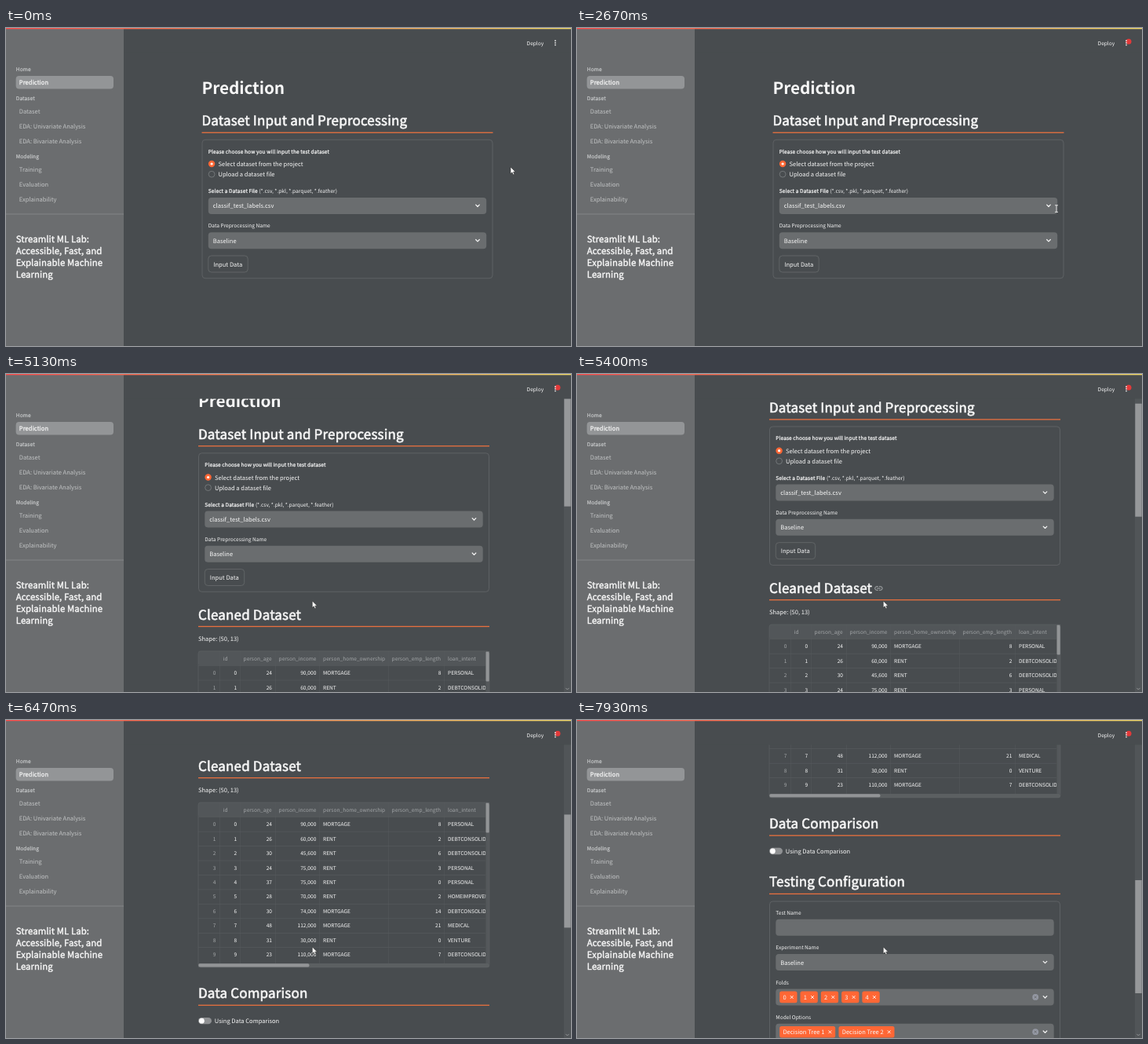
Recreate the animation shown at these times as an HTML page. Size 720 px wide and 405 px high, loop 8 s.

```html
<!DOCTYPE html>
<html lang="en">
<head>
<meta charset="utf-8">
<title>Prediction</title>
<style>
  html, body { margin: 0; width: 100%; height: 100%; overflow: hidden; background: #484c4f; }
  svg { display: block; width: 720px; height: 405px; }
  text { font: 7.55px "Noto Sans CJK JP", "Noto Sans CJK SC", "Noto Sans", sans-serif;
         fill: currentColor; color: #f7f7f7; text-rendering: geometricPrecision; white-space: pre; }
  .small { font-size: 6.6px; }
  .semi { stroke: currentColor; stroke-width: .036em; letter-spacing: .012em; }
  .h1 { font-size: 20.8px; font-weight: 700; letter-spacing: -.005em; }
  .h2 { font-size: 17px; letter-spacing: .0095em; }
  .h3 { font-size: 11.3px; letter-spacing: .0095em; }
  .dim { color: #c3c5c6; }
  .faint { color: #a3a6a8; }
  .end { text-anchor: end; }
  #button.hover rect { stroke: #ff6b3d; }
  #button.hover text { color: #ff6b3d; }
</style>
</head>
<body>
<svg id="stage" viewBox="0 0 720 405"></svg>
<script>
const BG = '#484c4f', FIELD = '#6a6d6f', LINE = '#676b6d', ACCENT = '#ff6735';

const text = (x, y, str, cls = '') => `<text x="${x}" y="${y}" class="${cls}">${str}</text>`;
const rect = (x, y, w, h, fill, r = 0, extra = '') =>
  `<rect x="${x}" y="${y}" width="${w}" height="${h}" rx="${r}" fill="${fill}" ${extra}/>`;
const circle = (x, y, r, fill, extra = '') => `<circle cx="${x}" cy="${y}" r="${r}" fill="${fill}" ${extra}/>`;
const stroke = (d, color, width = 1) =>
  `<path d="${d}" fill="none" stroke="${color}" stroke-width="${width}" stroke-linecap="round" stroke-linejoin="round"/>`;

const heading = (y, str) => text(0, y, str, 'semi h2') + rect(0, y + 8.4, 371, 1.3, '#e8703f');
const panel = (y, h) => rect(.5, y, 370, h, 'none', 4, `stroke="${LINE}" stroke-width=".7"`);
const chevron = y => stroke(`M349.2 ${y - 1.2}l2.3 2.3 2.3-2.3`, '#f7f7f7', 1.2);
const field = (y, value = '') => rect(8.3, y, 354.4, 21, FIELD, 4) + text(14.2, y + 13.5, value);
const select = (y, value) => field(y, value) + chevron(y + 10.5);
const cross = (x, y, r, color) => stroke(`M${x - r} ${y - r}l${2 * r} ${2 * r}m0 ${-2 * r}l${-2 * r} ${2 * r}`, color, .9);
const chip = (x, y, w, label) => rect(x, y, w, 14.6, ACCENT, 2.5) + text(x + 4.2, y + 10.2, label) +
  cross(x + w - 6.8, y + 7.4, 1.6, '#fff');
const multiselect = (y, labels, w, step) => select(y) +
  labels.map((label, i) => chip(13.2 + i * step, y + 3.2, w, label)).join('') +
  circle(339.2, y + 10.5, 3.9, '#9498a3') + cross(339.2, y + 10.5, 1.2, FIELD);

function sidebar() {
  const items = [
    [55, 'Home', 1], [91.5, 'Dataset', 1], [109, 'Dataset'], [128, 'EDA: Univariate Analysis'],
    [147, 'EDA: Bivariate Analysis'], [165.7, 'Modeling', 1], [183.3, 'Training'],
    [202, 'Evaluation'], [221, 'Explainability']];
  const title = ['Streamlit ML Lab:', 'Accessible, Fast, and', 'Explainable Machine', 'Learning'];
  return rect(0, 0, 150, 405, '#6b6d6f') + rect(12.6, 61, 124.4, 16.4, '#939597', 4) +
    text(16.8, 72.3, 'Prediction', 'semi') +
    items.map(([y, str, head]) => text(head ? 12.8 : 16.8, y, str, head ? 'semi small dim' : 'dim')).join('') +
    rect(0, 236.6, 150, .8, '#898b8d') +
    title.map((str, i) => text(12.8, 272.6 + i * 15.2, str, 'semi h3')).join('');
}

function inputForm() {
  return text(0, 83.6, 'Prediction', 'h1') + heading(124.2, 'Dataset Input and Preprocessing') + panel(142.3, 176.5) +
    text(8.3, 159.8, 'Please choose how you will input the test dataset', 'semi small') +
    circle(12.6, 173, 4.2, ACCENT) + circle(12.6, 173, 1.6, '#fff') +
    circle(12.6, 186.2, 3.9, BG, 'stroke="#85888a" stroke-width=".7"') +
    text(21, 176, 'Select dataset from the project') + text(21, 189.3, 'Upload a dataset file') +
    text(8.3, 210.2, 'Select a Dataset File ', 'semi small').replace('</text>',
      '<tspan stroke="none" letter-spacing="0">(*.csv, *.pkl, *.parquet, *.feather)</tspan></text>') +
    select(215.9, 'classif_test_labels.csv') +
    text(8.3, 254.4, 'Data Preprocessing Name', 'small') + select(260.2, 'Baseline') +
    `<g id="button">${rect(8.3, 290, 50.4, 21, BG, 4, `stroke="${LINE}" stroke-width=".8"`)}${text(14.8, 303.5, 'Input Data')}</g>`;
}

function table(top) {
  const columns = [[27, 'id'], [53, 'person_age'], [98, 'person_income'],
    [154.5, 'person_home_ownership'], [242, 'person_emp_length'], [313.5, 'loan_intent']];
  const rows = `24 90 MORTGAGE 8 PERSONAL|26 60 RENT 2 DEBTCONSOLIDATION|30 45.6 RENT 6 DEBTCONSOLIDATION
    |24 75 RENT 3 PERSONAL|37 75 RENT 0 PERSONAL|28 70 RENT 2 HOMEIMPROVEMENT|30 74 MORTGAGE 14 DEBTCONSOLIDATION
    |48 112 MORTGAGE 21 MEDICAL|31 30 RENT 0 VENTURE|23 110 MORTGAGE 7 DEBTCONSOLIDATION`.split('|');
  const pitch = 18.45;
  let out = rect(0, top, 371, 18.4, '#525659', 3);
  for (const [x, name] of columns)
    out += rect(x, top, .5, 205, '#55595c') + text(x + 4.6, top + 11.8, name, 'small faint');
  rows.forEach((row, i) => {
    const [age, income, home, years, intent] = row.trim().split(' ');
    const y = top + 30.2 + i * pitch;
    out += rect(0, y - 11.8, 366, .5, '#5a5e61') + text(22.3, y, i, 'small faint end') +
      text(49.2, y, i, 'small end') + text(94, y, age, 'small end') +
      text(150.3, y, (income * 1000).toLocaleString('en-US'), 'small end') +
      text(159, y, home, 'small') + text(309.3, y, years, 'small end') + text(318, y, intent, 'small');
  });
  return `<clipPath id="cells">${rect(0, top, 366.5, 205, '#000')}</clipPath><g clip-path="url(#cells)">${out}</g>` +
    rect(0, top + 205, 371, 5, '#5b5f61', 2) + rect(0, top + 205.3, 141.5, 4.4, '#929496', 2) +
    rect(366.5, top, 4.5, 205, '#54585b') + rect(366.5, top + .5, 4.5, 38, '#929496', 1) +
    rect(0, top, 371, 210, 'none', 3, 'stroke="#5f6366" stroke-width=".6"');
}

function results() {
  const link = stroke('M138.4 346h-1.4a2.3 2.3 0 0 0 0 4.6h1.4M140.4 346h1.4a2.3 2.3 0 0 1 0 4.6h-1.4M137.6 348.3h3.6', '#a9acae');
  return heading(354, 'Cleaned Dataset') + `<g id="link">${link}</g>` +
    text(0, 381.7, 'Shape: (50, 13)') + table(394.4) +
    heading(643.6, 'Data Comparison') +
    rect(0, 668.3, 17, 8.4, '#8f9193', 4.2) + circle(4.4, 672.5, 3.4, '#fff') +
    text(20.8, 675.6, 'Using Data Comparison') +
    heading(717.9, 'Testing Configuration') + panel(736.5, 260) +
    text(8.3, 753.4, 'Test Name', 'small') + field(759.3) +
    text(8.3, 797.7, 'Experiment Name', 'small') + select(803.6, 'Baseline') +
    text(8.3, 842, 'Folds', 'small') + multiselect(847.9, [0, 1, 2, 3, 4], 22.3, 26.3) +
    text(8.3, 886.3, 'Model Options', 'small') +
    multiselect(892.2, ['Decision Tree 1', 'Decision Tree 2'], 71, 75.3);
}

const outline = 'fill="#fff" stroke="#222" stroke-width=".5"';
const cursors = {
  arrow: `<path d="M0 0v8.6l2-1.8 1.3 3 1.5-.6-1.3-3h2.7z" ${outline}/>`,
  beam: stroke('M-1.6-4.2h3.2M0-4.2v8.6M-1.6 4.4h3.2', '#e8e8e8', .9),
  hand: `<path d="M-1 .2a1 1 0 0 1 2 0v3.9l3.4.8q1 .4.8 1.6l-.8 4.3h-4.8l-3.2-4.3q.4-1.3 2.6.2z" ${outline}/>`
};

const stage = document.getElementById('stage');
stage.innerHTML = `<defs><linearGradient id="bar"><stop stop-color="#ff4b4b"/><stop offset="1" stop-color="#f5dc6a"/></linearGradient></defs>` +
  rect(0, 0, 720, 405, BG) +
  `<g id="page">${inputForm()}<g id="results">${results()}</g></g>` +
  `<g id="scrollbar">${rect(711, 0, 9, 405, '#515558')}${rect(711.3, 8.6, 8.4, 144, '#96989a', 0, 'id="thumb"')}` +
  stroke('M713.6 400.2l1.8 1.8 1.8-1.8', '#9a9c9e', .9) + '</g>' +
  rect(150, 0, 570, 31.6, BG) + text(663.6, 21.8, 'Deploy', 'small') +
  circle(703, 17.2, 3.5, '#e23a3a', 'id="badge"') +
  [16.2, 18.9, 21.6].map(y => circle(700, y, .85, '#f7f7f7')).join('') +
  sidebar() + rect(0, 0, 720, 1.3, 'url(#bar)') +
  Object.entries(cursors).map(([name, shape]) => `<g id="${name}">${shape}</g>`).join('');

const $ = id => document.getElementById(id);
const show = (id, on) => $(id).setAttribute('visibility', on ? 'visible' : 'hidden');

// Keys are [time, ...values]; each span is eased in and out.
function at(keys, t) {
  const i = keys.findIndex(k => k[0] > t);
  if (i < 0) return keys.at(-1).slice(1);
  if (i === 0) return keys[0].slice(1);
  const [a, b] = [keys[i - 1], keys[i]];
  const u = (t - a[0]) / (b[0] - a[0]), e = u * u * (3 - 2 * u);
  return a.slice(1).map((v, j) => v + (b[j + 1] - v) * e);
}

const mouse = [[1900, 643, 177], [2670, 611, 230], [3500, 282, 298], [4300, 282, 298], [4900, 390.3, 289]];
const scroll = [[4990, 0], [5130, 41.5], [5270, 41.5], [5800, 262.5], [6200, 262.5], [7070, 379], [7200, 379], [7930, 505.5]];

function draw(t) {
  const loaded = t >= 4270;
  const [top] = at(scroll, t), [x, y] = at(mouse, t);
  const left = loaded ? 245 : 249.5;
  $('page').setAttribute('transform', `translate(${left} ${-top})`);
  $('thumb').setAttribute('y', 8.6 + top * .3865);
  show('results', loaded);
  show('scrollbar', loaded);
  show('badge', t >= 1270);
  show('link', loaded && t >= 5270 && t < 5900);

  const px = x - left, inside = (x0, x1, y0, y1) => px > x0 && px < x1 && y > y0 && y < y1;
  const onForm = top === 0;
  const onButton = onForm && inside(8, 59, 290, 311);
  const onSelect = onForm && (inside(8, 363, 216, 237) || inside(8, 363, 260, 281));
  const kind = onButton ? 'hand' : onSelect ? 'beam' : 'arrow';
  $('button').classList.toggle('hover', onButton);
  for (const name in cursors) show(name, name === kind);
  $(kind).setAttribute('transform', `translate(${x} ${y})`);
}

function tick() {
  draw(performance.now() % 8000);
  requestAnimationFrame(tick);
}
tick();
</script>
</body>
</html>
```
